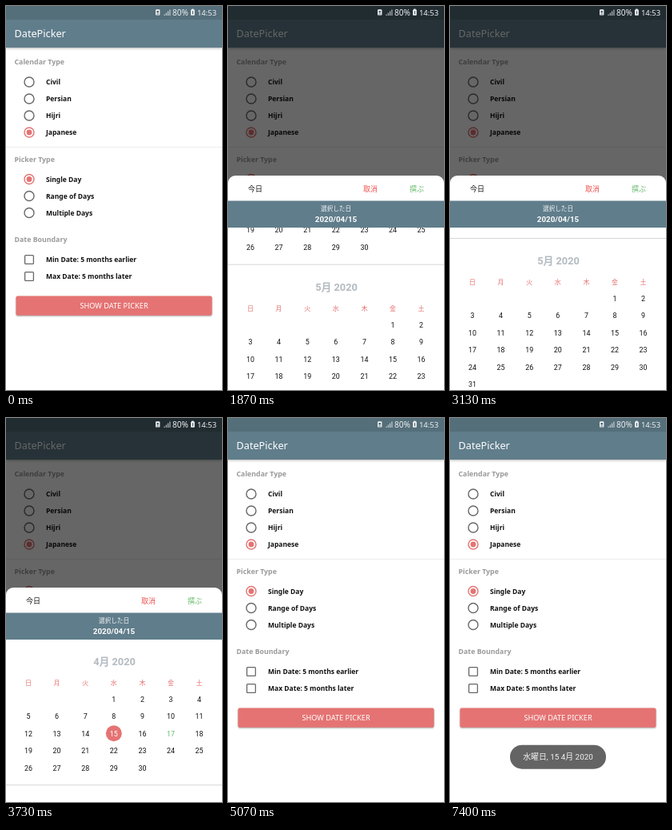
These frames come from a looping animation (270x480 px, 8.27 s). An HTML page with a canvas:

```html
<!DOCTYPE html>
<html lang="ja">
<head>
<meta charset="utf-8">
<title>Date picker</title>
<style>
html, body { margin: 0; width: 100%; height: 100%; overflow: hidden; background: #fff; }
canvas { display: block; width: 100%; height: 100%; }
</style>
</head>
<body>
<canvas id="stage"></canvas>
<script>
const W = 270, H = 480, LOOP = 8270;
const UI = '"Noto Sans", "Open Sans", sans-serif';
const CAL = 'Roboto, "Noto Sans CJK JP", "Noto Sans CJK", sans-serif';
const RED = '#e57373', GREEN = '#66bb6a', SLATE = '#607d8b', GREY = '#686868';
const SHEET_TOP = 212, ROW = 21.5;
const MONTHS = [
  { name: '4月 2020', first: 3, days: 30, today: 17, pick: 15 },
  { name: '5月 2020', first: 5, days: 31 },
  { name: '6月 2020', first: 1, days: 30 },
  { name: '7月 2020', first: 3, days: 31 }
];

const canvas = document.getElementById('stage');
const ctx = canvas.getContext('2d');
const ratio = window.devicePixelRatio || 1;
canvas.width = W * ratio;
canvas.height = H * ratio;

const span = (t, a, b) => Math.min(1, Math.max(0, (t - a) / (b - a)));
const ease = p => (1 - Math.cos(Math.PI * p)) / 2;
const easeOut = p => 1 - (1 - p) * (1 - p);
const colX = i => 28 + 35.6 * i;

// Text placed by the middle of its capitals
function text(str, x, y, size, color, { font = UI, weight = 400, align = 'left' } = {}) {
  ctx.font = `${weight} ${size}px ${font}`;
  ctx.textAlign = align;
  ctx.fillStyle = color;
  ctx.fillText(str, x, y + size * 0.36);
}

function rect(x, y, w, h, color) {
  ctx.fillStyle = color;
  ctx.fillRect(x, y, w, h);
}

function round(x, y, w, h, r, color) {
  ctx.beginPath();
  ctx.roundRect(x, y, w, h, r);
  ctx.fillStyle = color;
  ctx.fill();
}

function disc(x, y, r, color) {
  ctx.beginPath();
  ctx.arc(x, y, r, 0, 7);
  ctx.fillStyle = color;
  ctx.fill();
}

function ring(x, y, r, width, color) {
  ctx.beginPath();
  ctx.arc(x, y, r, 0, 7);
  ctx.lineWidth = width;
  ctx.strokeStyle = color;
  ctx.stroke();
}

function label(str, y) {
  text(str, 10.5, y, 8.8, '#9a9a9a', { weight: 600 });
}

function option(str, y) {
  text(str, 50, y, 8.5, '#111', { weight: 600 });
}

function radio(str, y, on) {
  ring(29, y, 6, 1.4, on ? RED : GREY);
  if (on) disc(29, y, 3.4, RED);
  option(str, y);
}

function checkbox(str, y) {
  ctx.beginPath();
  ctx.roundRect(23.6, y - 5.4, 10.8, 10.8, 1);
  ctx.lineWidth = 1.3;
  ctx.strokeStyle = GREY;
  ctx.stroke();
  option(str, y);
}

function shadow(color, blur, dy) {
  ctx.shadowColor = color;
  ctx.shadowBlur = blur * ratio;
  ctx.shadowOffsetY = dy * ratio;
}

function drawForm(press) {
  rect(0, 0, W, H, '#fff');
  ctx.save();
  shadow('rgba(0,0,0,.3)', 3, 1);
  rect(0, 17, W, 35, SLATE);
  ctx.restore();
  rect(0, 0, W, 17, '#546e7a');
  text('DatePicker', 10.5, 34.6, 12.7, '#fff');

  label('Calendar Type', 70);
  ['Civil', 'Persian', 'Hijri', 'Japanese'].forEach((s, i) => radio(s, 95 + 21 * i, i === 3));
  rect(0, 176, W, 1, '#eee');
  label('Picker Type', 191.7);
  ['Single Day', 'Range of Days', 'Multiple Days'].forEach((s, i) => radio(s, 216.5 + 21 * i, i === 0));
  label('Date Boundary', 292.2);
  checkbox('Min Date: 5 months earlier', 317);
  checkbox('Max Date: 5 months later', 338);

  ctx.save();
  shadow('rgba(0,0,0,.35)', 2, 1);
  round(12.5, 362.5, 245, 24.3, 2, RED);
  ctx.restore();
  if (press) round(12.5, 362.5, 245, 24.3, 2, `rgba(0,0,0,${0.12 * press})`);
  text('SHOW DATE PICKER', 135, 375, 9.2, '#fff', { align: 'center' });
}

function drawStatus() {
  const dark = '#40555f', light = '#eef1f2';
  round(187, 4.2, 5.4, 7.4, 1.2, light);
  disc(189.7, 7.2, 1.3, dark);
  rect(188.2, 9.6, 3, 0.8, dark);
  for (let i = 0; i < 4; i++) {
    const h = 1.5 + 2 * i;
    rect(197.5 + 2.3 * i, 12 - h, 1, h, 'rgba(255,255,255,.8)');
  }
  text('80%', 208, 8.2, 10.1, light);
  rect(232.2, 3.6, 2.4, 1.4, light);
  round(231, 4.6, 4.8, 7.2, 0.8, light);
  rect(232.9, 6.2, 1, 4, dark);
  text('14:53', 263.2, 8.2, 9.5, light, { align: 'right' });
}

function drawMonth(m, y, picked) {
  const mid = { font: CAL, align: 'center' };
  text(m.name, 135.5, y, 12.8, '#b3bbc1', { ...mid, weight: 700 });
  [...'日月火水木金土'].forEach((d, i) => text(d, colX(i), y + 27, 8, RED, mid));
  for (let d = 1; d <= m.days; d++) {
    const cell = m.first + d - 1;
    const x = colX(cell % 7), cy = y + 47.3 + ROW * Math.floor(cell / 7);
    const on = picked && d === m.pick;
    if (on) disc(x, cy, 10, RED);
    text(d, x, cy, 8.9, on ? '#fff' : d === m.today ? GREEN : '#111', mid);
  }
  const rows = Math.ceil((m.first + m.days) / 7);
  const end = y + 47.3 + ROW * rows;
  rect(0, end - 0.5, W, 1, '#d6d6d6');
  return end + 28;
}

function drawSheet(offset, alpha, scroll, picked) {
  ctx.save();
  ctx.globalAlpha = alpha;
  ctx.translate(0, offset);
  round(0, SHEET_TOP, W, H - SHEET_TOP + 40, [9, 9, 0, 0], '#fff');
  const cal = { font: CAL };
  text('今日', 25, 229, 9, '#111', cal);
  text('取消', 169, 229, 9, '#ef5350', cal);
  text('撰ぶ', 227, 229, 9, GREEN, cal);

  ctx.save();
  ctx.beginPath();
  ctx.rect(0, 277, W, H);
  ctx.clip();
  let y = 304 - scroll;
  for (const m of MONTHS) y = drawMonth(m, y, picked);
  ctx.restore();

  rect(0, 243.5, W, 33.5, SLATE);
  text('選択した日', 135, 253.5, 7.6, '#f4f6f7', { font: CAL, align: 'center' });
  if (picked) text('2020/04/15', 135, 266.5, 9.8, '#fff', { font: CAL, weight: 700, align: 'center' });
  ctx.restore();
}

function drawToast(alpha) {
  ctx.save();
  ctx.globalAlpha = alpha;
  round(75, 408.7, 120, 30, 15, '#646464');
  text('水曜日, 15 4月 2020', 135, 423.8, 9.9, '#f2f2f2', { font: CAL, align: 'center' });
  ctx.restore();
}

function drawTouch(alpha) {
  ctx.save();
  ctx.globalAlpha = alpha;
  disc(240, 235, 7, 'rgba(220,220,220,.5)');
  ring(240, 235, 6.8, 0.6, 'rgba(150,150,150,.4)');
  ctx.restore();
}

function draw(t) {
  ctx.setTransform(canvas.width / W, 0, 0, canvas.height / H, 0, 0);

  drawForm(span(t, 60, 140) * (1 - span(t, 300, 450)));

  const dim = 0.6 * easeOut(span(t, 230, 640)) * (1 - span(t, 4790, 5065));
  if (dim > 0) rect(0, 0, W, H, `rgba(0,0,0,${dim})`);
  drawStatus();

  const enter = easeOut(span(t, 270, 560));
  const leave = span(t, 4740, 4937) ** 2;
  if (enter > 0 && leave < 1) {
    const scroll = 318 * (ease(span(t, 1350, 2500)) - ease(span(t, 2580, 3725)));
    drawSheet(96 * (1 - enter + leave), enter * (1 - leave ** 2.2), scroll, t >= 1200);
  }

  const touch = span(t, 4590, 4620) * (1 - span(t, 4870, 4980));
  if (touch > 0) drawTouch(touch);
  const toast = span(t, 5130, 5530);
  if (toast > 0) drawToast(toast);
}

const start = performance.now();
function tick() {
  draw((performance.now() - start) % LOOP);
  requestAnimationFrame(tick);
}
tick();
</script>
</body>
</html>
```
